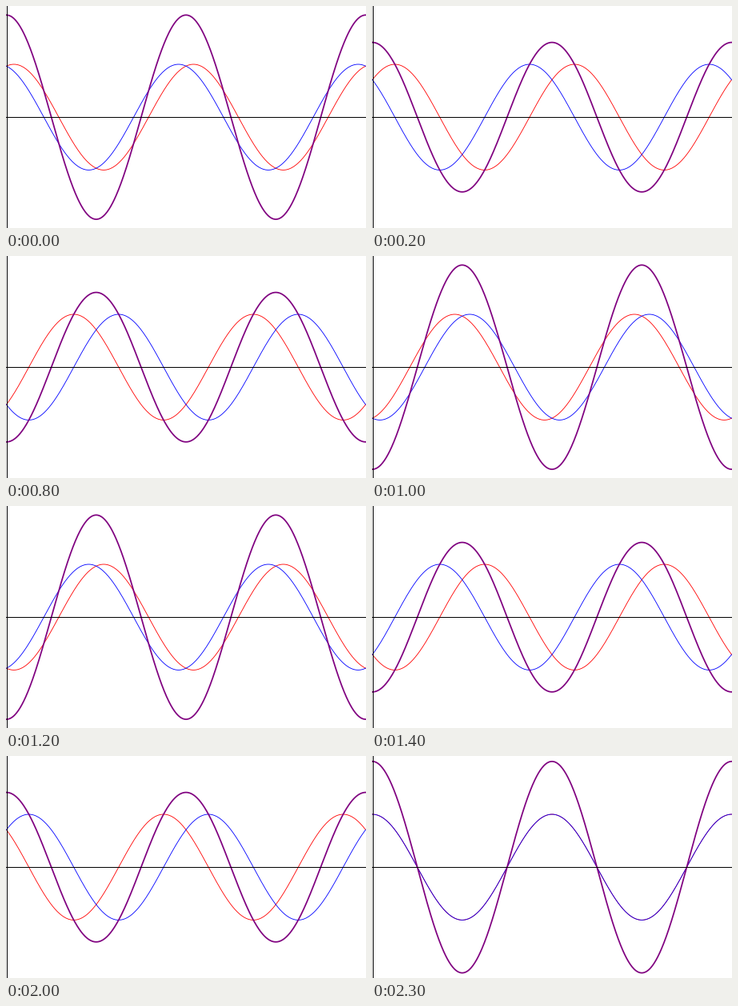
Recreate the animation shown at these times as a matplotlib script. Size 450 by 278 pixels, loop 2400 ms.

```python
import numpy as np
import matplotlib.pyplot as plt
from matplotlib.animation import FuncAnimation

W, H, DPI = 450, 278, 100
FRAMES, INTERVAL = 24, 100
X0, Y0 = 0.5, 139.2          # origin in pixels
WAVELENGTH, AMP = 224.5, 66.2


def px(width):
    """Pixels to points."""
    return width * 72 / DPI


fig = plt.figure(figsize=(W / DPI, H / DPI), dpi=DPI, facecolor="white")
ax = fig.add_axes([0, 0, 1, 1])
ax.set_xlim(0, W)
ax.set_ylim(H, 0)
ax.axis("off")

x = np.linspace(X0, X0 + 2 * WAVELENGTH, 600)
theta = 2 * np.pi * (x - X0) / WAVELENGTH


def curve(color, width, z):
    return ax.plot([], [], color=color, lw=px(width), zorder=z)[0]


right = curve("#ff0000", 0.85, 1)
left = curve("#0000ff", 0.85, 2)
total = curve("#800080", 1.75, 3)

axis_style = dict(color="black", lw=px(1), zorder=4, antialiased=False)
ax.plot([0, W], [138.5, 138.5], **axis_style)
ax.plot([0.5, 0.5], [0, H], **axis_style)


def update(i):
    phase = 2 * np.pi * (i + 1) / FRAMES
    a, b = np.cos(theta - phase), np.cos(theta + phase)
    for line, y in ((right, a), (left, b), (total, a + b)):
        line.set_data(x, Y0 - AMP * y)
    return right, left, total


anim = FuncAnimation(fig, update, frames=FRAMES, interval=INTERVAL,
                     repeat=True, repeat_delay=0, blit=False)
plt.show()
```
